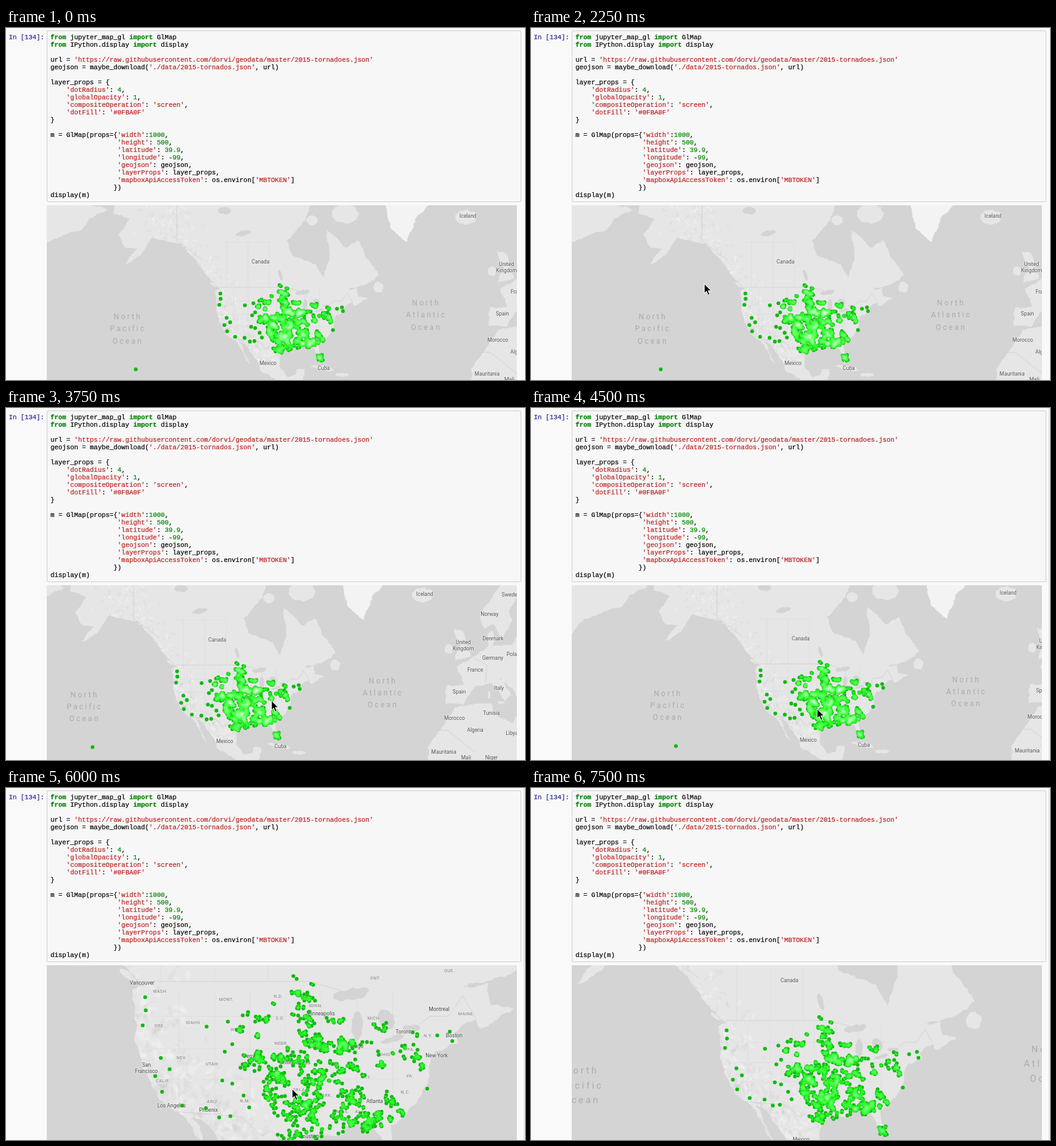
Animation, 828 px wide and 562 px high, one loop 8250 ms. Source, as an HTML page with a canvas:

```html
<!DOCTYPE html>
<html lang="en">
<head>
<meta charset="utf-8">
<title>Notebook map</title>
<style>
  html, body { margin: 0; width: 100%; height: 100%; overflow: hidden; background: #f9f9f9; }
  body { position: relative; }
  pre { position: absolute; top: 9px; margin: 0; color: #000; -webkit-text-stroke: .22px;
        font: 10.47px/12px "Liberation Mono", "Courier New", monospace; }
  #prompt { left: 4.5px; color: #26269a; }
  #code { left: 71px; }
  #cell { position: absolute; left: 65px; top: 4px; width: 755px; height: 272px;
          border: 1px solid #cfcfcf; border-radius: 2px; background: #f7f7f7; }
  b { color: #008000; }
  i { color: #ba2121; font-style: normal; }
  u { color: #008800; text-decoration: none; }
  canvas { position: absolute; left: 65px; top: 283px; }
  #edge { position: absolute; left: 826px; top: 0; width: 1px; height: 562px; background: #d6d6d6; }
  #cursor { position: absolute; left: -1px; top: -1px; }
</style>
</head>
<body>
<div id="cell"></div>
<pre id="prompt">In [134]:</pre>
<pre id="code"><b>from</b> jupyter_map_gl <b>import</b> GlMap
<b>from</b> IPython.display <b>import</b> display

url = <i>'https://raw.githubusercontent.com/dorvi/geodata/master/2015-tornadoes.json'</i>
geojson = maybe_download(<i>'./data/2015-tornados.json'</i>, url)

layer_props = {
    <i>'dotRadius'</i>: <u>4</u>,
    <i>'globalOpacity'</i>: <u>1</u>,
    <i>'compositeOperation'</i>: <i>'screen'</i>,
    <i>'dotFill'</i>: <i>'#0FBA0F'</i>
}

m = GlMap(props={<i>'width'</i>:<u>1000</u>,
                 <i>'height'</i>: <u>500</u>,
                 <i>'latitude'</i>: <u>39.9</u>,
                 <i>'longitude'</i>: -<u>99</u>,
                 <i>'geojson'</i>: geojson,
                 <i>'layerProps'</i>: layer_props,
                 <i>'mapboxApiAccessToken'</i>: os.environ[<i>'MBTOKEN'</i>]
                })
display(m)</pre>
<canvas id="map" width="750" height="279"></canvas>
<canvas id="dots" width="750" height="279"></canvas>
<div id="edge"></div>
<svg id="cursor" width="15" height="22" viewBox="-1 -1 15 22">
  <path d="M.5.5V15.5L4 12.3L6.6 18.4L9.2 17.3L6.6 11.4H11.4Z" fill="#000" stroke="#fff" stroke-width="1"/>
</svg>
<script>
const $ = id => document.getElementById(id);
const ctx = $('map').getContext('2d'), dotCtx = $('dots').getContext('2d');
const LOOP = 8250, STEP = 250, DEG = 3.78, MAX_ZOOM = 2.505;
const WATER = '#d4d4d4', LAND = '#e6e6e6';

let seed = 11;
const rnd = () => {
  seed = (seed + 0x6d2b79f5) | 0;
  let v = Math.imul(seed ^ seed >>> 15, seed | 1);
  v ^= v + Math.imul(v ^ v >>> 7, v | 61);
  return ((v ^ v >>> 14) >>> 0) / 4294967296;
};
const gauss = () => (rnd() + rnd() + rnd() + rnd() - 2) * 1.73;
const pairs = a => a.flatMap((v, i) => i % 2 ? [[a[i - 1], v]] : []);

// Web Mercator to map units
const project = (lon, lat) => [805.7 + DEG * lon,
  627 - DEG * 180 / Math.PI * Math.log(Math.tan(Math.PI / 4 + lat * Math.PI / 360))];

// Coast between two points by midpoint displacement
function coast(path, a, b) {
  const dx = b[0] - a[0], dy = b[1] - a[1], len = Math.hypot(dx, dy);
  if (len < 2) return path.lineTo(...b);
  const o = (rnd() - .5) * Math.min(.3, 3 / len);
  const mid = [(a[0] + b[0]) / 2 - dy * o, (a[1] + b[1]) / 2 + dx * o];
  coast(path, a, mid);
  coast(path, mid, b);
}
function ring(path, points) {
  path.moveTo(...points[0]);
  points.forEach((p, i) => coast(path, p, points[(i + 1) % points.length]));
  path.closePath();
}
const region = (path, flat) => ring(path, pairs(flat).map(p => project(...p)));
function blob(path, lon, lat, rx, ry, tilt = 0) {
  const [cx, cy] = project(lon, lat), c = Math.cos(tilt), s = Math.sin(tilt);
  ring(path, Array.from({ length: 9 }, (_, i) => {
    const x = rx * Math.cos(i * .698), y = ry * Math.sin(i * .698);
    return [cx + x * c - y * s, cy + x * s + y * c];
  }));
}
function line(path, ...flat) {
  pairs(flat).forEach((p, i) => path[i ? 'lineTo' : 'moveTo'](...project(...p)));
}

const land = new Path2D(), ice = new Path2D(), lakes = new Path2D();
const borders = new Path2D(), states = new Path2D();

// North America, clockwise from the Bering Strait
region(land, [-166,70, -168,65.6, -161,64.5, -166,61.5, -162,58.7, -157.5,58.6, -163,55, -156,57.3, -151,61,
  -144,60, -139.5,59.7, -133,56, -128,51.8, -122.7,48.5, -124.7,48.2, -124.4,42.8, -122.4,37.6, -120.6,34.6,
  -117.1,32.5, -112.1,25.2, -110,23, -114.8,31.6, -113,31.2, -106.4,23.2, -105.5,20.4, -98,16.2, -88,13,
  -87,21.4, -90.5,21, -91,19, -94.4,18.2, -97.7,22.3, -97.2,27, -94.7,29.4, -89.3,29.1, -88.8,30.4, -84,30,
  -82.8,28.5, -80.7,25.2, -80.2,27, -81.4,30.5, -76,35, -73.8,40.7, -70,41.7, -70.7,43, -67,44.7, -66,43.5,
  -60.5,45.8, -64.5,46.4, -64.8,48.8, -69,48.4, -60,50.2, -55.7,52.2, -61.8,57.2, -64.5,60.3, -69.5,58.8,
  -78,62.5, -76.6,56.7, -79.2,51.5, -82.3,55, -92.5,57, -94.5,60.5, -87,64.2, -82,70]);
// Europe, clockwise from Portugal
region(land, [-9.3,37, -8.9,43.2, -1.6,43.4, -4.7,48.4, 1.6,50.9, 8.5,53.8, 8.2,56.8, 10.6,57.6, 10.9,54, 19,54.5,
  23.5,59.2, 30,59.9, 22.5,60, 25,65.2, 22,65.7, 17.3,61.8, 18.8,59.8, 14.3,55.5, 11,59, 7,58, 5,61, 14,67,
  45,70, 45,36.5, 27.3,37, 26.2,39.3, 29,41, 41,41.4, 33.5,45, 28,43.5, 28,41.4, 23.8,40.5, 22.5,36.6,
  19.3,42, 13.2,45.5, 18.3,40, 15.8,38, 10.3,43.8, 3.2,42.8, -.3,39.3, -2,36.8]);
region(land, [-17,14, -17,21, -9.7,30, -5.4,35.9, 10,37.3, 11,33.8, 19,30.3, 20,32.8, 34.5,31.4, 36,36.5, 45,36.5, 45,14]);
region(land, [-5.7,50.1, 1.3,51.2, -.2,54, -2,57.6, -6,58, -3,53.9, -4.5,52.5]);
region(land, [-170,66.1, -178,64.6, -181,62.5, -197,60, -205,55, -205,70]);
region(ice, [-54,68, -51,63, -44,60, -40.5,64.5, -25,70]);

const islands = [[-56,49,8,9], [-70,65.5,22,16], [-84,64.3,9,8], [-125.6,49.7,6.5,2,.6], [-79.5,21.7,20,2.5,.2],
  [-71.3,19,11,3.5], [-19,64.9,18,12], [-8,53.3,7,8], [14,37.5,5,2.5], [9,40,2.5,6]];
const basins = [[-88,47.6,12,4,-.2], [-87,43.8,3.5,10], [-82,44.6,5,7,-.5], [-81,42.2,8,2,-.3], [-77.8,43.6,6,2],
  [-97.3,52.2,3,9,-.3], [-113,61.8,13,4,-.2], [-121,66,11,6]];
islands.forEach(b => blob(land, ...b));
basins.forEach(b => blob(lakes, ...b));

line(borders, -123,49, -95.2,49, -89.6,48);
line(borders, -76.3,44.1, -74.7,45, -71.5,45, -69.2,47.4, -67,44.8);
line(borders, -117.1,32.5, -106.5,31.8, -103,29, -101.4,29.8, -97.2,25.9);
line(borders, -141,70, -141,60.2, -130,55.9);
line(borders, -13,27.7, -8.7,27.7, -4.8,25, 3,19.2);
line(borders, 25,31.6, 25,20);
line(borders, 2.5,51, 8,49, 7.5,43.8);
line(borders, 23,54.5, 23.5,50, 29,45.3);
line(states, -123,60, -102,60);
for (let lon = -120; lon < -100; lon += 9) line(states, lon, 49, lon, 60);
for (let lon = -117; lon < -80; lon += 6) line(states, lon, 32, lon, 48);
for (let lat = 37; lat < 48; lat += 4) line(states, -121, lat, -80, lat);

// Relief along the western ranges
const relief = Array.from({ length: 900 }, () => {
  const lat = 24 + rnd() * 43, lon = -106 - (lat - 25) + gauss() * 6;
  return [...project(lon, lat), .7 + rnd() * 2, rnd() * 3, rnd() < .55];
});

// Layout coordinates of the closest view, back to map units
const fromNear = (x, y) => [(x + 634.7) / MAX_ZOOM, (y + 728.1) / MAX_ZOOM];

// Lone storms, then outbreaks: centre, spread, number of clumps
const storms = pairs([222,334, 223,355, 218,379, 320,381, 354,373, 361,409, 349,421, 247,431, 238,460, 261,449,
  249,485, 281,507, 345,467, 361,472, 379,491, 319,511, 340,526, 358,524, 388,510, 708,389, 712,404, 688,395,
  656,393, 672,480, -116,637]);
const outbreaks = [[468,335,10,14,11], [411,356,9,12,5], [398,436,9,10,13], [382,398,10,20,4], [432,454,8,11,16],
  [465,432,18,12,14], [498,412,10,10,14], [540,408,14,9,20], [470,380,22,20,9], [430,486,8,10,13],
  [470,512,18,13,40], [490,470,10,9,14], [530,450,28,20,18], [560,485,18,16,18], [545,524,14,10,18],
  [586,535,13,8,17], [470,552,26,7,14], [620,500,16,10,7], [598,388,6,6,4], [660,435,8,16,7], [608,430,18,14,6],
  [535,372,18,8,4], [620,588,7,5,6]];
for (const [x, y, sx, sy, n] of outbreaks)
  for (let i = 0; i < n; i++) {
    const cx = x + gauss() * sx, cy = y + gauss() * sy, count = 1 + rnd() * rnd() * 8;
    for (let j = 0; j < count; j++) storms.push([cx + gauss() * 3, cy + gauss() * 3]);
  }
const dots = storms.map(p => fromNear(...p));

const countries = [['Canada',406,373], ['Iceland',737,300], ['United',798.5,377], ['Kingdom',798.5,387],
  ['France',817.5,421], ['Spain',792,456], ['Morocco',784.5,498], ['Algeria',817.5,517], ['Mauritania',767.5,552],
  ['Mali',803,561], ['Mexico',418,535], ['Cuba',507,543], ['Sweden',874.5,301], ['Finland',907,320],
  ['Norway',840.5,332], ['Denmark',846,371], ['Germany',845.5,402], ['Poland',880.5,396], ['Belarus',914.5,387],
  ['Ukraine',927.5,412], ['Italy',855.5,450], ['Romania',902.5,432], ['Greece',898,469], ['Turkey',941.5,467],
  ['Tunisia',843.5,490], ['Libya',876,522], ['Egypt',921,524], ['Niger',843.5,561]];
const cities = [['Vancouver',217,311], ['San',224,442], ['Francisco',224,452], ['Los Angeles',264,507],
  ['Phoenix',323,514], ['Denver',391,428], ['Houston',483,556], ['Minneapolis',502,360], ['Chicago',555,412],
  ['Toronto',636,389], ['Montreal',691,353], ['Boston',715,395], ['New York',687,427], ['Atlanta',588,500],
  ['United States',461,438]];
const abbrs = [['WASH.',246,324], ['ORE.',245,379], ['IDAHO',298,374], ['MONT.',351,337], ['N.D.',434,332],
  ['S.D.',437,367], ['WYO.',367,385], ['NEBR.',439,407], ['NEV.',280,430], ['UTAH',328,440], ['COLO.',386,441],
  ['CALIF.',250,467], ['ARIZ.',330,500], ['N.M.',381,499], ['ONT.',589,303], ['QUE.',707,291], ['MINN.',494,347],
  ['WIS.',537,369], ['MICH.',587,367], ['N.Y.',673,395], ['PA.',646,417], ['OHIO',604,425], ['MO.',507,453],
  ['KY.',577,461], ['VA.',644,459], ['N.C.',637,485], ['MAINE',733,360], ['ALA.',565,516], ['MISS.',537,516],
  ['ARK.',512,490], ['OKLA.',468,481], ['IOWA',498,404]];

// Keyframes start with their time
const pan = [[2500,0,0], [3000,-121.5,0], [3250,-150,-1], [3750,-69,-3.5], [4250,24.2,-5.2]];
const zoom = [[4500,1], [5250,1.565], [6000,MAX_ZOOM], [6750,1.565]];
const pointer = [[250,375,179], [500,376,189], [750,376,189], [1000,442,255], [1500,400,443], [2250,276,408],
  [2500,428,465], [3000,306,470], [3250,278,469], [3500,379,467], [4250,511,466], [4500,456,480],
  [6500,456,480], [7000,470,113]];

function at(keys, t) {
  const i = keys.findIndex(k => k[0] >= t);
  if (i < 1) return keys[i ? keys.length - 1 : 0].slice(1);
  const a = keys[i - 1], b = keys[i], f = (t - a[0]) / (b[0] - a[0]);
  return a.slice(1).map((v, j) => v + (b[j + 1] - v) * f);
}
function view(t) {
  const [s] = at(zoom, t), [dx, dy] = at(pan, t);
  return [s, dx + 437.8 * (1 - s), dy + 480.3 * (1 - s)];
}

function label(text, x, y, font, color, spacing = 0, halo = true) {
  ctx.font = font;
  ctx.letterSpacing = spacing + 'px';
  ctx.fillStyle = color;
  if (halo) ctx.strokeText(text, x, y + .8);
  ctx.fillText(text, x + spacing / 2, y + .8);
}

function drawLand(s, tx, ty) {
  ctx.setTransform(1, 0, 0, 1, 0, 0);
  ctx.fillStyle = WATER;
  ctx.fillRect(0, 0, 750, 279);
  ctx.setTransform(s, 0, 0, s, tx - 65, ty - 283);
  ctx.fillStyle = LAND;
  ctx.fill(land);
  ctx.save();
  ctx.clip(land);
  for (const [x, y, r, a, dark] of relief) {
    ctx.fillStyle = dark ? 'rgba(0,0,0,.025)' : 'rgba(255,255,255,.2)';
    ctx.beginPath();
    ctx.ellipse(x, y, r * 1.6, r * .7, a, 0, 7);
    ctx.fill();
  }
  ctx.lineWidth = .7 / s;
  ctx.strokeStyle = '#dcdcdc';
  ctx.stroke(states);
  ctx.restore();
  ctx.fillStyle = '#f3f3f3';
  ctx.fill(ice);
  ctx.fillStyle = WATER;
  ctx.fill(lakes);
  ctx.lineWidth = .7 / s;
  ctx.strokeStyle = '#cbcbcb';
  ctx.stroke(borders);
}

function drawLabels(s, place) {
  ctx.setTransform(1, 0, 0, 1, -65, -283);
  ctx.textAlign = 'center';
  ctx.textBaseline = 'middle';
  ctx.lineJoin = 'round';
  ctx.lineWidth = 1.6;
  ctx.strokeStyle = 'rgba(238,238,238,.75)';
  const grow = s ** .43;
  for (const [name, ox, oy] of [['Pacific', 193, 480], ['Atlantic', 669, 458]]) {
    const [x, y] = place(ox, oy);
    ['North', name, 'Ocean'].forEach((w, i) => label(w, x, y + (i - 1) * 19.3 * grow,
      `${12 * grow}px Roboto, sans-serif`, '#ababab', 3 * grow, false));
  }
  const plain = '8.4px Roboto, sans-serif';
  if (s < 1.9) {
    for (const [w, x, y] of countries) label(w, ...place(x, y), plain, '#585858');
  } else {
    const near = (x, y) => place(...fromNear(x, y));
    for (const [w, x, y] of abbrs) label(w, ...near(x, y), '500 7px Roboto, sans-serif', '#929292', .4);
    for (const [w, x, y] of cities) label(w, ...near(x, y), plain, '#4c4c4c');
  }
}

function drawDots(place) {
  dotCtx.setTransform(1, 0, 0, 1, -65, -283);
  dotCtx.clearRect(65, 283, 750, 279);
  dotCtx.globalCompositeOperation = 'screen';
  dotCtx.fillStyle = '#0fba0f';
  for (const p of dots) {
    dotCtx.beginPath();
    dotCtx.arc(...place(...p), 3.05, 0, 7);
    dotCtx.fill();
  }
}

let shown = -1;
function tick() {
  const t = Math.floor(performance.now() % LOOP / STEP) * STEP;
  if (t !== shown) {
    shown = t;
    const [s, tx, ty] = view(t), place = (x, y) => [x * s + tx, y * s + ty];
    drawLand(s, tx, ty);
    drawLabels(s, place);
    drawDots(place);
    const [x, y] = at(pointer, t);
    $('cursor').style.transform = `translate(${x}px, ${y}px)`;
    $('cursor').style.display = t >= 250 && t <= 7000 ? 'block' : 'none';
    $('edge').style.display = t >= 4250 ? 'block' : 'none';
  }
  requestAnimationFrame(tick);
}
tick();
</script>
</body>
</html>
```
